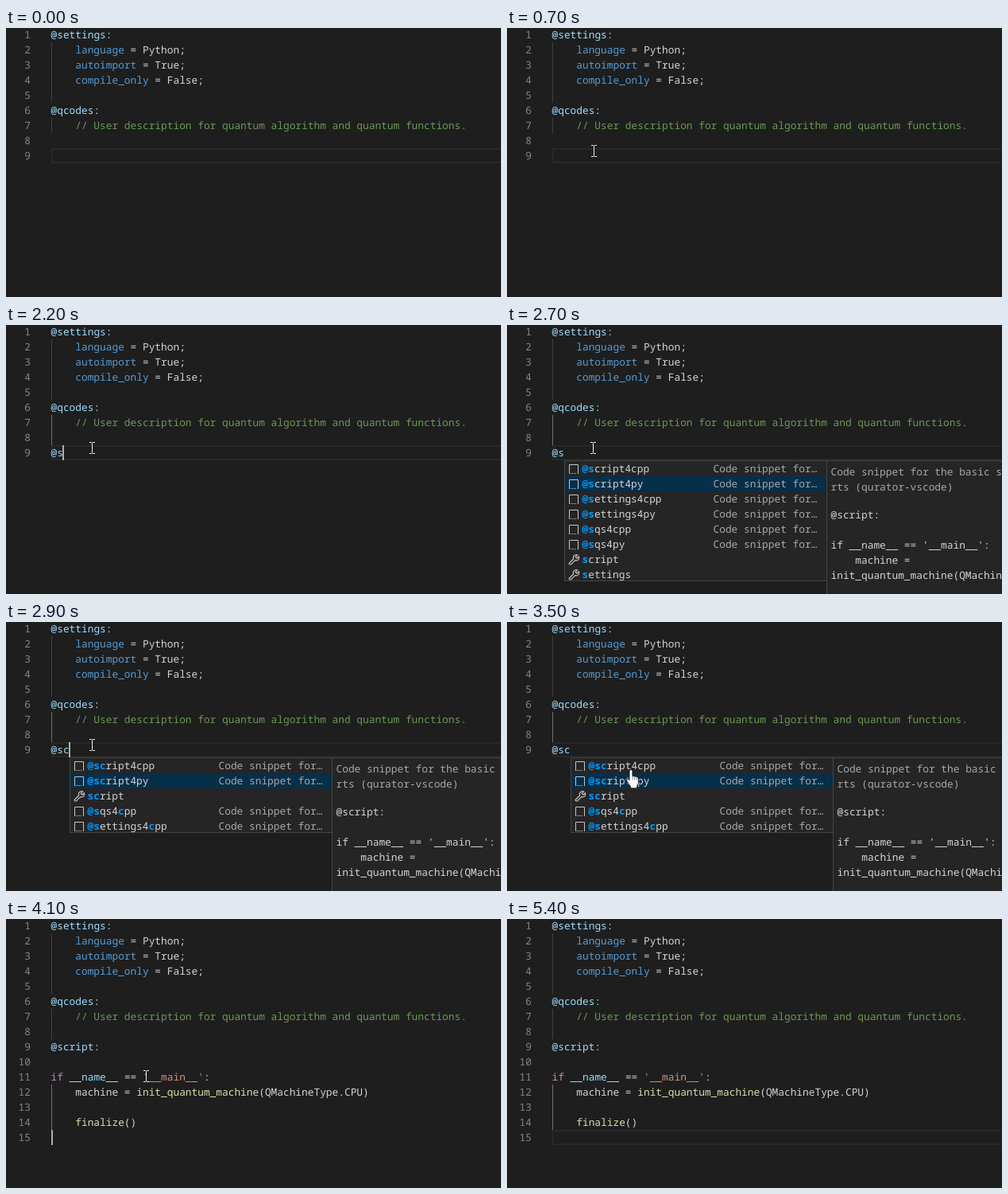
Write an HTML page that moves like this. It is 623 by 338 pixels and loops after 5.5 s.

```html
<!DOCTYPE html>
<html lang="en">
<head>
<meta charset="utf-8">
<title>Code completion</title>
<style>
  html, body { margin: 0; width: 100%; height: 100%; overflow: hidden; background: #1e1e1e; }
  svg { display: block; }
  text {
    font: 12.83px "Noto Sans Mono", "DejaVu Sans Mono", monospace;
    white-space: pre;
    text-rendering: geometricPrecision;
  }
  rect { shape-rendering: crispEdges; }
</style>
</head>
<body>
<svg id="stage" width="623" height="338" viewBox="0 0 623 338"></svg>
<script>
(() => {
const LOOP = 5500, STEP = 100, ROW = 19, CHAR = 7.698, LEFT = 56.5;
const C = {
  plain: '#d4d4d4', key: '#569cd6', name: '#9cdcfe', note: '#6a9955', word: '#c586c0',
  str: '#ce9178', call: '#dcdcaa', num: '#858585', match: '#0097fb', dim: '#a8a8a8',
  guide: '#404040', active: '#707070', icon: '#c5c5c5'
};
const stage = document.getElementById('stage');

function add(parent, tag, attrs = {}) {
  const el = document.createElementNS('http://www.w3.org/2000/svg', tag);
  for (const k in attrs) el.setAttribute(k, attrs[k]);
  parent.append(el);
  return el;
}
const group = (parent = stage) => add(parent, 'g');
const rect = (g, x, y, width, height, fill) => add(g, 'rect', { x, y, width, height, fill });
const show = (el, on) => { el.style.display = on ? '' : 'none'; };
const lineTop = line => (line - 1) * ROW - 1;

// parts: colour, text, colour, text, ...
function write(g, x, y, ...parts) {
  const el = add(g, 'text', { x, y });
  for (let i = 0; i < parts.length; i += 2) {
    const span = add(el, 'tspan', { fill: parts[i] });
    span.textContent = parts[i + 1];
    if (parts[i] === C.match) span.style.fontWeight = 'bold';
  }
}
const code = (g, line, col, ...parts) => write(g, LEFT + col * CHAR, lineTop(line) + 14, ...parts);

function numbers(g, from, to) {
  for (let n = from; n <= to; n++)
    write(g, 31 - String(n).length * CHAR, lineTop(n) + 14, C.num, String(n));
}
const guide = (g, from, to, fill) => rect(g, 57, lineTop(from), 1, (to - from + 1) * ROW, fill);

function highlight(line) {
  const g = group();
  add(g, 'rect', { x: 58, y: lineTop(line) + 1, width: 580, height: ROW - 2,
    fill: 'none', stroke: '#282828', 'stroke-width': 2 });
  return g;
}

// Editor
const firstLine = highlight(9), lastLine = highlight(15);
const base = group();
numbers(base, 1, 9);
guide(base, 2, 5, C.guide);
code(base, 1, 0, C.name, '@settings:');
[['language', 'Python'], ['autoimport', 'True'], ['compile_only', 'False']].forEach(([k, v], i) =>
  code(base, i + 2, 4, C.key, k, C.plain, ` = ${v};`));
code(base, 6, 0, C.name, '@qcodes:');
code(base, 7, 4, C.note, '// User description for quantum algorithm and quantum functions.');

const guideShort = guide(stage, 7, 7, C.guide);
const guideLong = guide(stage, 7, 8, C.guide);

const typed = ['@', '@s', '@sc'].map(s => {
  const g = group();
  code(g, 9, 0, C.name, s);
  return g;
});

const done = group();
numbers(done, 10, 15);
guide(done, 12, 14, C.active);
code(done, 9, 0, C.name, '@script:');
code(done, 11, 0, C.word, 'if', C.name, ' __name__', C.plain, ' == ', C.str, "'__main__'", C.plain, ':');
code(done, 12, 4, C.plain, 'machine = ', C.call, 'init_quantum_machine', C.plain, '(QMachineType.CPU)');
code(done, 14, 4, C.call, 'finalize', C.plain, '()');

const caret = rect(stage, 57, 0, 2, ROW, '#aeafad');

// Completion list
function snippetIcon(g, x, y) {
  add(g, 'path', { d: `M${x + 1.5} ${y + 12}v-10.5h11v10.5`, fill: 'none', stroke: C.icon });
  for (let i = 0; i < 6; i++) rect(g, x + 1 + i * 2 + (i > 4 ? 1 : 0), y + 12, 1, 1, C.icon);
}
function wrenchIcon(g, x, y) {
  add(g, 'path', {
    d: `M${x + 1.6} ${y + 11}l5-5q-1-3.6 2-5 1.6-.6 3 0l-2.4 2.4 1.8 1.8 2.4-2.4q.8 2.4-.6 4-1.6 1.6-4 .8l-5 5q-1.2.8-2.2 0t0-1.6z`,
    fill: 'none', stroke: C.icon, 'stroke-width': 1.2
  });
}

// A label marks its matched letters with brackets: "[@s]cript".
function popup(x, labels) {
  const g = group(), h = labels.length * ROW;
  rect(g, x + 330, 170, 300, 180, '#454545');
  rect(g, x + 331, 171, 300, 180, '#252526');
  rect(g, x, 170, 331, h, '#454545');
  rect(g, x + 1, 171, 329, h - 2, '#252526');
  rect(g, x + 1, 190, 329, ROW, '#062f4a');
  labels.forEach((label, i) => {
    const y = 171 + i * ROW, snippet = label.includes('@');
    (snippet ? snippetIcon : wrenchIcon)(g, x + 5, y + 3);
    const parts = label.split(/[[\]]/).flatMap((s, k) => [k % 2 ? C.match : C.plain, s]);
    write(g, x + 22.5, y + 14, ...parts);
    if (snippet) write(g, x + 187.5, y + 14, C.dim, 'Code snippet for…');
  });
  [
    [189, C.dim, 'Code snippet for the basic structure'],
    [208, C.dim, 'rts (qurator-vscode)'],
    [243, C.plain, '@script:'],
    [281, C.plain, "if __name__ == '__main__':"],
    [300, C.plain, '    machine ='],
    [319, C.plain, 'init_quantum_machine(QMachineType.CPU)']
  ].forEach(([y, fill, s]) => write(g, x + 335.5, y, fill, s));
  return g;
}
const wide = popup(72, ['[@s]cript4cpp', '[@s]cript4py', '[@s]ettings4cpp', '[@s]ettings4py',
  '[@s]qs4cpp', '[@s]qs4py', '[s]cript', '[s]ettings']);
const narrow = popup(80, ['[@sc]ript4cpp', '[@sc]ript4py', '[sc]ript', '[@s]qs4[c]pp', '[@s]ettings4[c]pp']);

// Pointer
const pointer = group(), beam = group(pointer), hand = group(pointer);
[[-3, -7, 3, 1], [1, -7, 3, 1], [0, -6, 1, 13], [-3, 7, 3, 1], [1, 7, 3, 1]]
  .forEach(([x, y, w, h]) => rect(beam, x, y, w, h, '#f0f0f0'));
add(hand, 'path', {
  d: 'M-4 1.5a2 2 0 0 1 4 0v6l5 .8q2.4.6 2.4 3v4q0 2.4-1.6 4.4v3.2h-8.4v-2.4q-2-2-4.4-6.6-1-2 .4-2.6 1.4-.4 2.6 1.6z',
  fill: '#fff', stroke: '#111', 'stroke-width': 1
});
add(hand, 'path', { d: 'M0 8v4M2.6 9v3.4M5 9.4v3', stroke: '#555', 'stroke-width': .7 });

// Pointer moves: start time, end time, end point
const moves = [
  [200, 700, 109, 154],
  [700, 800, 108, 152],
  [1100, 1200, 108, 154],
  [3100, 3700, 176, 197],
  [4300, 4900, 619, 49]
];
function pointerAt(t) {
  let x = 315, y = 188;
  for (const [from, to, tx, ty] of moves) {
    const p = Math.min(1, Math.max(0, (t - from) / (to - from)));
    const e = p * p * (3 - 2 * p);
    x += (tx - x) * e;
    y += (ty - y) * e;
  }
  return [Math.round(x), Math.round(y)];
}

const caretOn = [[900, 1400], [1800, 2700], [2900, 3400], [3900, 4400], [4900, 5400]];
const within = (t, a, b) => t >= a && t < b;

function draw(t) {
  const finished = t >= 4100;
  const count = [1800, 2200, 2900].filter(s => t >= s).length;
  show(firstLine, !finished);
  show(lastLine, t >= 5000);
  show(guideShort, t < 1800);
  show(guideLong, t >= 1800);
  guideLong.setAttribute('fill', finished ? C.guide : C.active);
  typed.forEach((g, i) => show(g, !finished && count === i + 1));
  show(done, finished);
  show(wide, within(t, 2300, 2900));
  show(narrow, within(t, 2900, 4100));

  show(caret, caretOn.some(([a, b]) => within(t, a, b)));
  caret.setAttribute('x', finished || !count ? 57 : Math.floor(LEFT + count * CHAR));
  caret.setAttribute('y', lineTop(finished ? 15 : 9));

  const [x, y] = pointerAt(t);
  const overList = within(t, 2300, 4100) && y > 170;
  show(pointer, within(t, 200, 5000));
  show(beam, !overList);
  show(hand, overList);
  pointer.setAttribute('transform', `translate(${x} ${y})`);
}

const start = performance.now();
function tick() {
  const t = (performance.now() - start) % LOOP;
  draw(Math.floor(t / STEP) * STEP);
  requestAnimationFrame(tick);
}
tick();
})();
</script>
</body>
</html>
```
